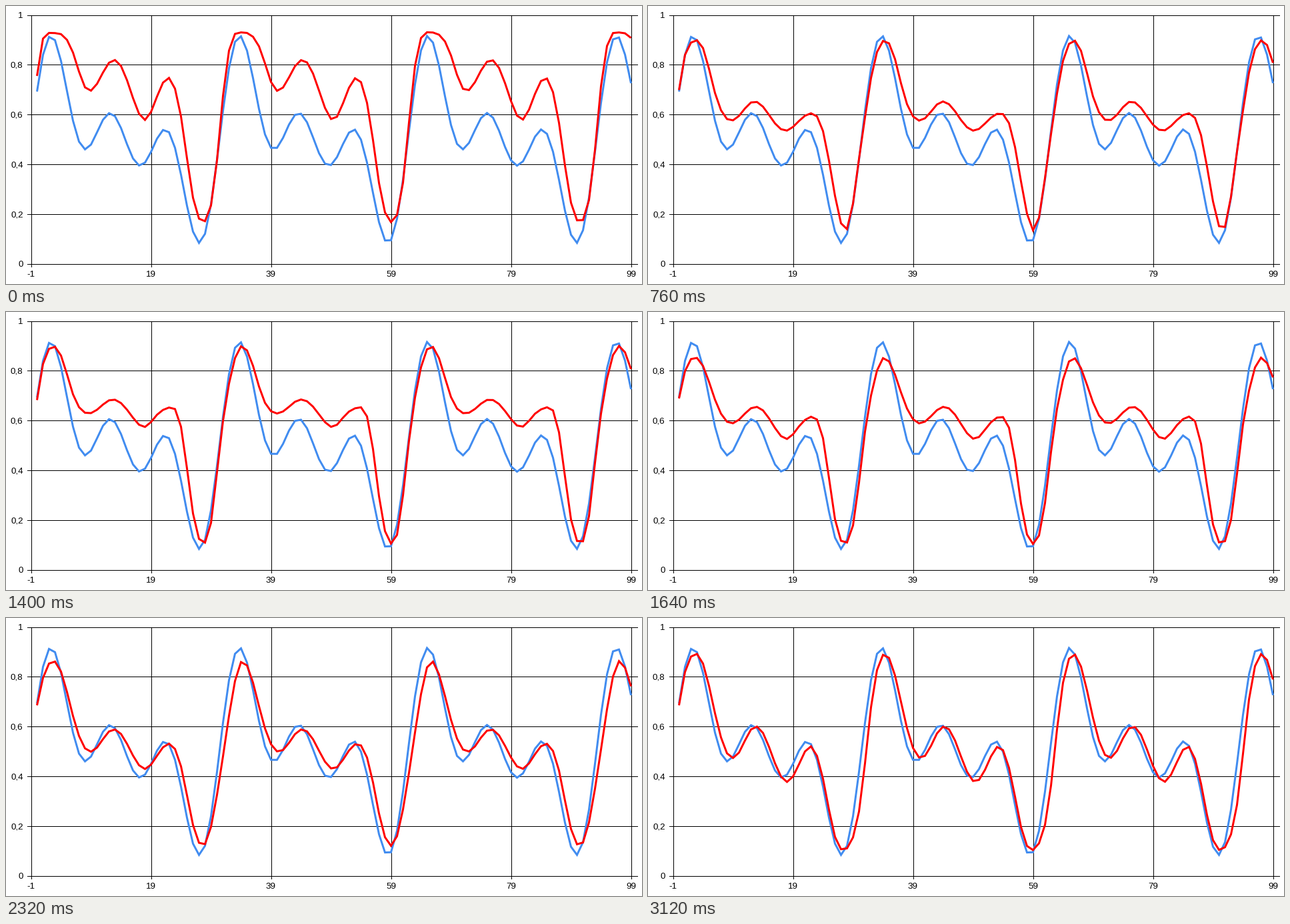
These frames come from a looping animation (954x418 px, 3.2 s). A matplotlib script:

```python
import numpy as np
import matplotlib.pyplot as plt
from matplotlib.animation import FuncAnimation

W, H, DPI = 954, 418, 64  # a power of two keeps the pixel size exact
PX = 72 / DPI
TICKS, TICK_MS, LAST_STEP = 80, 40, 62
PERIOD = 10 * np.pi

# Fitted curve at selected training steps, in thousandths at each knot
KNOTS = np.array([0, 1, 2, 4, 6, 8, 10, 12, 14, 16, 18, 20,
                  22, 24, 26, 28, 29, 30, 31, 32, 34], float)
FITS = {
    0: [755, 905, 928, 923, 849, 709, 723, 808, 795, 666, 578, 672,
        747, 592, 265, 171, 234, 416, 675, 857, 930],
    9: [710, 843, 888, 870, 690, 570, 583, 645, 627, 549, 513, 558,
        596, 515, 273, 152, 244, 400, 577, 746, 892],
    21: [690, 837, 890, 865, 685, 603, 615, 656, 641, 589, 564, 600,
         622, 560, 272, 126, 235, 443, 600, 747, 899],
    28: [682, 827, 888, 861, 705, 631, 643, 681, 670, 611, 574, 623,
         652, 575, 226, 109, 188, 392, 598, 748, 898],
    39: [697, 768, 795, 768, 650, 534, 537, 597, 590, 503, 449, 502,
         553, 457, 188, 111, 172, 318, 492, 637, 789],
    46: [685, 795, 853, 821, 642, 512, 515, 580, 570, 483, 429, 482,
         531, 440, 204, 127, 196, 325, 480, 643, 859],
    62: [685, 819, 881, 853, 653, 492, 495, 588, 574, 452, 377, 448,
         520, 390, 156, 110, 154, 258, 452, 677, 888],
}


def hermite(x, y, m, q):
    """Cubic through (x, y) with slopes m, evaluated at q."""
    i = np.clip(np.searchsorted(x, q, side="right") - 1, 0, len(x) - 2)
    h = x[i + 1] - x[i]
    s = (q - x[i]) / h
    return ((1 + 2 * s) * (1 - s) ** 2 * y[i] + s * (1 - s) ** 2 * h * m[i]
            + s * s * (3 - 2 * s) * y[i + 1] + s * s * (s - 1) * h * m[i + 1])


def smooth_slopes(x, y):
    """Slopes of the natural cubic spline."""
    n = len(x)
    h, d = np.diff(x), np.diff(y) / np.diff(x)
    a, b = np.zeros((n, n)), np.zeros(n)
    a[0, :2], b[0] = (2, 1), 3 * d[0]
    a[-1, -2:], b[-1] = (1, 2), 3 * d[-1]
    for i in range(1, n - 1):
        a[i, i - 1:i + 2] = h[i], 2 * (h[i - 1] + h[i]), h[i - 1]
        b[i] = 3 * (h[i] * d[i - 1] + h[i - 1] * d[i])
    return np.linalg.solve(a, b)


def monotone_slopes(x, y):
    """Slopes that keep each column of y free of overshoot."""
    d = np.diff(y, axis=0) / np.diff(x)[:, None]
    a, b = d[:-1], d[1:]
    same = a * b > 0
    mid = np.where(same, 2 * a * b / np.where(same, a + b, 1), 0)
    return np.vstack([d[:1], mid, d[-1:]])


def target(x):
    t = 0.2 * (x + 1)
    return 0.5 + (np.sin(t) + np.sin(2 * t) + np.sin(3 * t)) / 6


def fit_curve(knot_values):
    """All points of the fit: a short run-in, then a periodic part."""
    x = np.append(KNOTS, KNOTS[3:5] + PERIOD)
    y = np.append(knot_values, knot_values[3:5])
    u = np.where(XS < 4, XS, 4 + (XS - 4) % PERIOD)
    return hermite(x, y, smooth_slopes(x, y), u)


def px(x):
    return 46.5 + 9 * x


def py(v):
    return 387.5 - 374 * v


XS = np.arange(100.0)
STEPS = np.array(list(FITS), float)
VALUES = np.array(list(FITS.values())) / 1000
RATES = monotone_slopes(STEPS, VALUES)

fig = plt.figure(figsize=(W / DPI, H / DPI), dpi=DPI, facecolor="white")
ax = fig.add_axes([0, 0, 1, 1])
ax.set_xlim(0, W)
ax.set_ylim(H, 0)
ax.axis("off")

grid = dict(color="black", lw=PX, antialiased=False, zorder=1)
label = dict(family="Liberation Sans", size=13.33 * PX, color="black")
for k in range(6):
    v, x = k / 5, 20 * k - 1
    ax.plot([32, 946.5], [py(v)] * 2, **grid)
    ax.plot([px(x)] * 2, [13.5, 392], **grid)
    ax.text(25.5, py(v) + 4.5, f"{v:g}".replace(".", ","),
            ha="right", va="baseline", **label)
    ax.text(px(x), 407, str(x), ha="center", va="baseline", **label)

series = dict(lw=3 * PX, solid_joinstyle="miter", solid_capstyle="butt")
ax.plot(px(XS), py(target(XS)), color="#418CF0", zorder=2, **series)
fit_line, = ax.plot([], [], color="#FF0000", zorder=3, **series)


def update(tick):
    # 50 ms training steps shown on a 40 ms clock
    step = min((4 * tick + 1) // 5, LAST_STEP)
    values = hermite(STEPS, VALUES, RATES, step)
    fit_line.set_data(px(XS), py(fit_curve(values)))
    return fit_line,


anim = FuncAnimation(fig, update, frames=TICKS, interval=TICK_MS,
                     repeat=True, repeat_delay=0)
plt.show()
```
